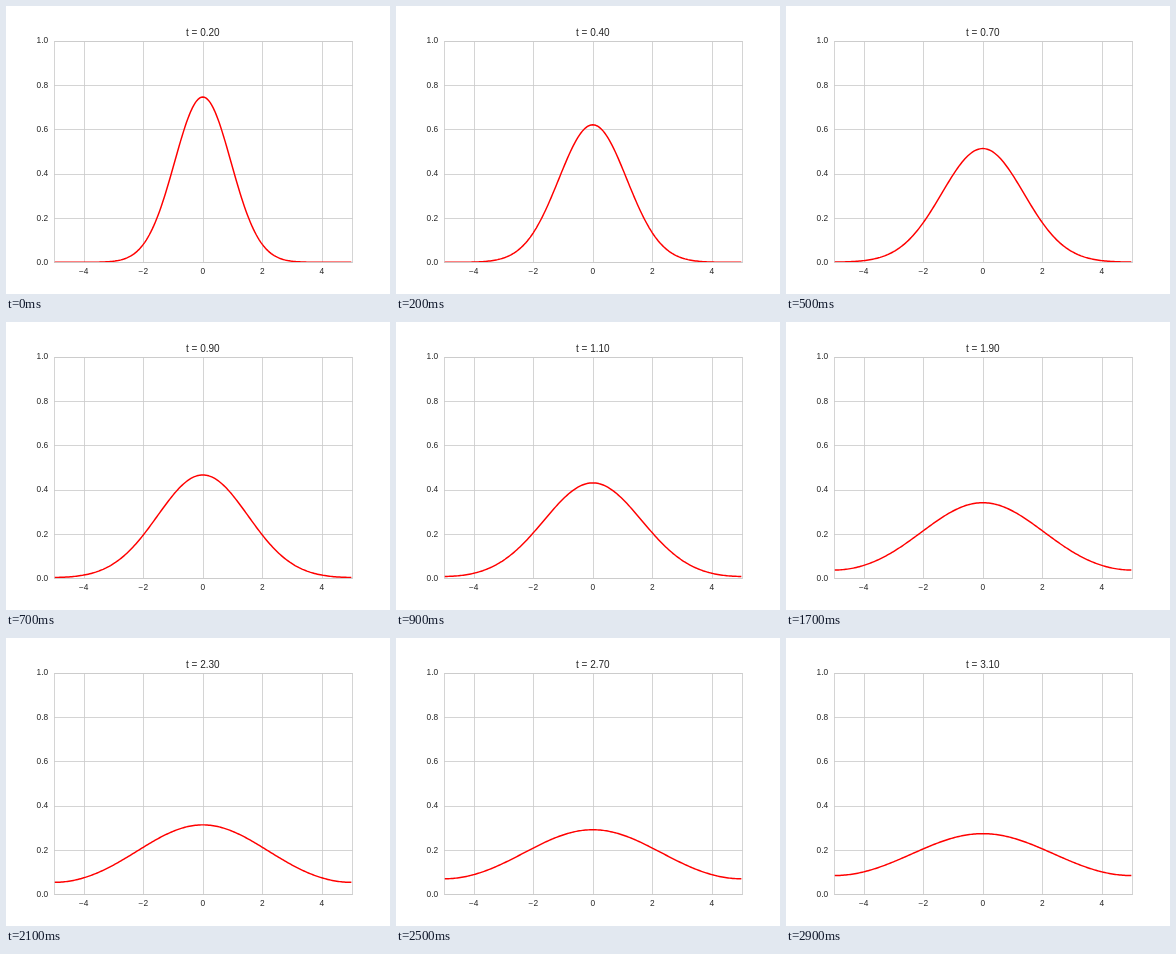
An HTML page that plays this animation: 384 by 288 pixels, repeating every 3 s.

```html
<!DOCTYPE html>
<html lang="en">
<head>
<meta charset="utf-8">
<title>Heat diffusion</title>
<style>
  html, body { margin: 0; width: 384px; height: 288px; overflow: hidden; background: #fff; }
  svg { display: block; font: 8.33px "Liberation Sans", Arial, sans-serif; fill: #262626; }
  #grid, #frame { fill: none; stroke: #ccc; stroke-width: .83; }
  #curve { fill: none; stroke: #f00; stroke-width: 1.46; stroke-linejoin: round; }
  #title { font-size: 10px; }
</style>
</head>
<body>
<svg width="384" height="288">
  <clipPath id="axes"><rect x="48" y="34.56" width="297.6" height="221.76"/></clipPath>
  <path id="grid"/>
  <path id="curve" clip-path="url(#axes)"/>
  <path id="frame" d="M48.5 35.5H346.5V256.5H48.5Z"/>
  <g id="labels"></g>
  <text id="title" x="196.8" y="30" text-anchor="middle"></text>
</svg>
<script>
const $ = id => document.getElementById(id);
const px = x => 196.8 + x * 29.76;
const py = u => 256.32 - u * 221.76;
const snap = v => Math.round(v) + .5;

let grid = '', labels = '';
const label = (x, y, anchor, text) =>
  labels += `<text x="${x}" y="${y}" text-anchor="${anchor}">${text}</text>`;

for (let x = -4; x <= 4; x += 2) {
  grid += `M${snap(px(x))} 35V257`;
  label(px(x), 268, 'middle', String(x).replace('-', '\u2212'));
}
for (let i = 0; i <= 5; i++) {
  const y = py(i / 5);
  grid += `M48 ${snap(y)}H347`;
  label(42.2, y + 2.7, 'end', (i / 5).toFixed(1));
}
$('grid').setAttribute('d', grid);
$('labels').innerHTML = labels;

// Spreading Gaussian, with mirror images for the insulated ends at x = ±5
function heat(x, t) {
  const s = 1 + 4 * t;
  return [-10, 0, 10].reduce((sum, c) => sum + Math.exp(-((x - c) ** 2) / s), 0) / Math.sqrt(s);
}

function draw(now) {
  const t = .2 + Math.floor(now % 3000 / 100) / 10;
  const points = Array.from({ length: 201 }, (_, i) => {
    const x = -5 + i / 20;
    return px(x).toFixed(2) + ' ' + py(heat(x, t)).toFixed(2);
  });
  $('curve').setAttribute('d', 'M' + points.join('L'));
  $('title').textContent = 't = ' + t.toFixed(2);
}

const start = performance.now();
function tick() {
  draw(performance.now() - start);
  requestAnimationFrame(tick);
}
tick();
</script>
</body>
</html>
```
